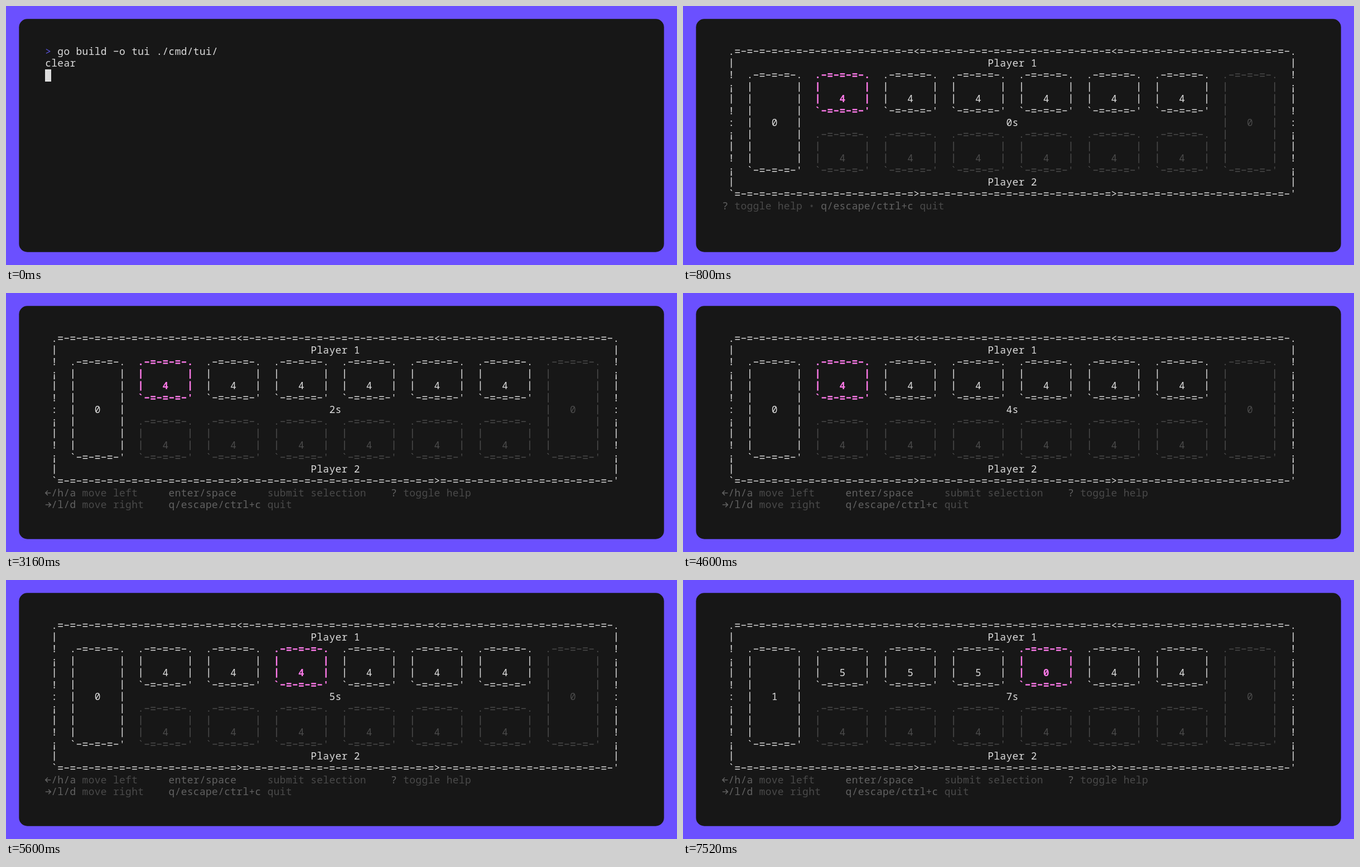
Write an HTML page with a canvas that moves like this. It is 1203x466 px and loops after 8000 ms.

```html
<!DOCTYPE html>
<html lang="en">
<head>
<meta charset="utf-8">
<title>Terminal board game</title>
<style>
  html, body { margin: 0; width: 100%; height: 100%; overflow: hidden; background: #6b50ff; }
  canvas { display: block; }
</style>
</head>
<body>
<canvas id="stage" width="1203" height="466"></canvas>
<script>
const ctx = document.getElementById('stage').getContext('2d');
const LOOP = 8000;
const CELL = 11.07, ROW = 21.4, LEFT = 70, TOP = 71.6, BASE = 15.9;
const FONT = '17.9px "Noto Sans Mono", "DejaVu Sans Mono", monospace';
const FG = '#dddddd', DIM = '#4b4b4b', PINK = '#ff7aea', PROMPT = '#5b56e0';
const KEY = '#626262', DESC = '#4a4a4a', DOT = '#3c3c3c';

// Value of the last [start, value] step reached at time t.
const at = (steps, t) => steps.filter(s => s[0] <= t).pop()[1];

const typed = [[40, './'], [80, './t'], [160, './tu'], [200, './tui']];
const seconds = [[800, 0], [1760, 1], [2720, 2], [3680, 3], [4600, 4], [5560, 5], [6520, 6], [7480, 7]];
const selection = [[800, 0], [5120, 1], [5600, 2], [6120, 3]];
const HELP_AT = 3160, SOW_AT = 7520;

function bar(x, y, w, h) {
  ctx.fillRect(x - w / 2, y - h / 2, w, h);
}

function arrow(x, y, dir) {
  const tip = x + 4.8 * dir, back = x + 0.6 * dir;
  ctx.strokeStyle = ctx.fillStyle;
  ctx.lineWidth = 1.5;
  ctx.beginPath();
  ctx.moveTo(x - 4.8 * dir, y);
  ctx.lineTo(tip, y);
  ctx.moveTo(back, y - 4.2);
  ctx.lineTo(tip, y);
  ctx.lineTo(back, y + 4.2);
  ctx.stroke();
}

// Rules and arrows are drawn as strokes, all other characters as type.
function glyph(ch, col, row, bold) {
  const x = LEFT + (col + 0.5) * CELL;
  const base = TOP + row * ROW + BASE;
  const mid = base - 6;
  const line = bold ? 2.4 : 1.5;
  if (ch === '-') bar(x, mid, 8, line);
  else if (ch === '=') {
    bar(x, mid - 2.15, 8.7, line);
    bar(x, mid + 2.15, 8.7, line);
  } else if (ch === '|') bar(x, mid, line, 17.2);
  else if (ch === '←') arrow(x, mid, -1);
  else if (ch === '→') arrow(x, mid, 1);
  else if (ch !== ' ') ctx.fillText(ch, x, base);
}

function print(text, col, row, color = FG, bold = false) {
  ctx.fillStyle = color;
  ctx.font = (bold ? 'bold ' : '500 ') + FONT;
  [...text].forEach((ch, i) => glyph(ch, col + i, row, bold));
}

function cursor(col, row) {
  ctx.fillStyle = FG;
  ctx.fillRect(Math.round(LEFT + col * CELL), Math.round(TOP + row * ROW - 0.3), 11, 22);
}

function box(col, row, height, numberRow, count, color, bold) {
  print('.-=-=-=-.', col, row, color, bold);
  for (let r = row + 1; r < row + height - 1; r++) print('|       |', col, r, color, bold);
  print("`-=-=-=-'", col, row + height - 1, color, bold);
  print(String(count), col + 4, numberRow, color, bold);
}

function frame() {
  const edge = mark => '=-'.repeat(45).split('')
    .map((ch, i) => i === 29 || i === 61 ? mark : ch).join('');
  print('.' + edge('<') + '.', 1, 0);
  [...'|!¡|!:¡|!¡|'].forEach((ch, i) => {
    print(ch, 1, i + 1);
    print(ch, 92, i + 1);
  });
  print('`' + edge('>') + "'", 1, 12);
}

function help(full) {
  if (!full) {
    print('?', 0, 13, KEY);
    print('toggle help', 2, 13, DESC);
    print('•', 14, 13, DOT);
    print('q/escape/ctrl+c', 16, 13, KEY);
    print('quit', 32, 13, DESC);
    return;
  }
  print('←/h/a', 0, 13, KEY);
  print('→/l/d', 0, 14, KEY);
  print('move left', 6, 13, DESC);
  print('move right', 6, 14, DESC);
  print('enter/space', 20, 13, KEY);
  print('q/escape/ctrl+c', 20, 14, KEY);
  print('submit selection', 36, 13, DESC);
  print('quit', 36, 14, DESC);
  print('?', 56, 13, KEY);
  print('toggle help', 58, 13, DESC);
}

function game(t) {
  const sown = t >= SOW_AT;
  const selected = at(selection, t);
  const pits = sown ? [5, 5, 5, 0, 4, 4] : Array(6).fill(4);
  frame();
  print('Player 1', 43, 1);
  print('Player 2', 43, 11);
  print(at(seconds, t) + 's', 46, 6);
  box(4, 2, 9, 6, sown ? 1 : 0, FG, false);
  box(81, 2, 9, 6, 0, DIM, false);
  pits.forEach((count, i) => {
    const active = i === selected;
    box(15 + 11 * i, 2, 4, 4, count, active ? PINK : FG, active);
    box(15 + 11 * i, 7, 4, 9, 4, DIM, false);
  });
  help(t >= HELP_AT);
}

function shell(t) {
  print('>', 0, 0, PROMPT);
  if (t < 40) {
    print('go build -o tui ./cmd/tui/', 2, 0);
    print('clear', 0, 1);
    cursor(0, 2);
    return;
  }
  const command = at(typed, t);
  print(command, 2, 0);
  if (t < 240) cursor(2 + command.length, 0);
  else cursor(0, 1);
}

function draw(t) {
  ctx.fillStyle = '#6b50ff';
  ctx.fillRect(0, 0, 1203, 466);
  ctx.fillStyle = '#171717';
  ctx.beginPath();
  ctx.roundRect(23.3, 23.3, 1156.4, 419.4, 15);
  ctx.fill();
  ctx.textAlign = 'center';
  if (t < 800) shell(t);
  else game(t);
}

const start = performance.now();
function tick() {
  draw((performance.now() - start) % LOOP);
  requestAnimationFrame(tick);
}
tick();
</script>
</body>
</html>
```
